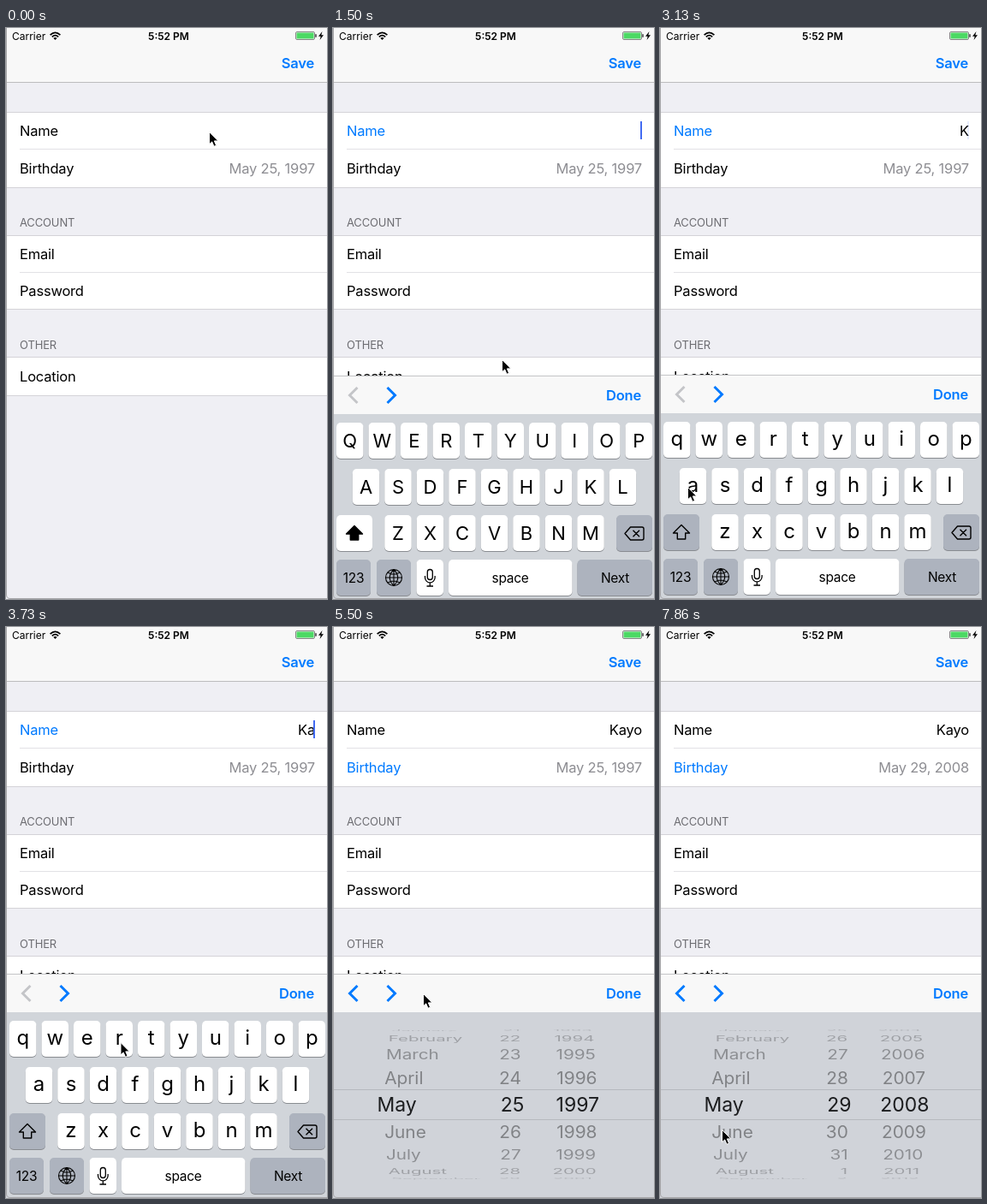
An HTML page that plays this animation: 375 px wide and 667 px high, repeating every 8 s.

```html
<!DOCTYPE html>
<html lang="en">
<head>
<meta charset="utf-8">
<title>Profile form</title>
<style>
html, body { margin: 0; width: 375px; height: 667px; overflow: hidden; background: #efeff4; }
svg { display: block; }
text { font: 16.5px Inter, "Open Sans", sans-serif; letter-spacing: -.2px; white-space: pre; }
.bold { font-weight: 600; }
.status { font-size: 12px; letter-spacing: 0; }
.head { font-size: 13px; letter-spacing: -.15px; }
.upper { font-size: 22px; letter-spacing: 0; }
.lower { font-size: 24px; letter-spacing: 0; }
.big { font-size: 36px; letter-spacing: 0; }
.small { font-size: 15.5px; letter-spacing: -.3px; }
.wheel { font-size: 23px; letter-spacing: 0; }
.pop { filter: drop-shadow(0 1px 4px #0006); }
</style>
</head>
<body>
<svg id="stage" width="375" height="667" viewBox="0 0 375 667">
  <defs>
    <clipPath id="band"><path d="M0 541H375V575H0Z"/></clipPath>
    <clipPath id="rest"><path d="M0 451H375V540H0ZM0 576H375V667H0Z"/></clipPath>
  </defs>
  <g id="form"></g>
  <g id="live"></g>
</svg>
<script>
const LOOP = 8000, STEPS = 54;
const BLUE = '#007aff', GRAY = '#8e8e93', EDGE = '#d4d3d8', SPLIT = '#e2e1e5';
const NAME = 'Kayo';
const MONTHS = ['January', 'February', 'March', 'April', 'May', 'June', 'July', 'August', 'September'];
const ROWS = [['qwertyuiop', 4, 460], ['asdfghjkl', 22.75, 514], ['zxcvbnm', 60.25, 568]];

// Each key press: letter index, first step, last step
const PRESSES = [[0, 16, 17], [1, 22, 23], [2, 26, 27], [3, 29, 30]];
const POINTER = [[0, 237, 121], [2, 266, 212], [4, 215, 160], [5, 211, 126], [8, 208, 126],
  [10, 197, 387], [13, 250, 475], [15, 301, 538], [17, 301, 538], [21, 32, 536], [23, 33, 536],
  [24, 60, 488], [26, 207, 482], [27, 209, 482], [29, 320, 482], [30, 125, 432], [32, 68, 428],
  [34, 68, 428], [37, 105, 428], [39, 120, 440], [41, 288, 590], [43, 286, 510], [44, 288, 585],
  [45, 285, 556], [46, 285, 530], [48, 212, 575], [50, 210, 520], [51, 200, 540], [53, 72, 587]];
const SLIDE = [[7, 262], [8, 150], [9, 22], [10, 1], [11, 0]];
const YEAR = [[41, 1997], [43, 2003], [44, 2005.2], [45, 2007.3], [46, 2008]];
const DAY = [[48, 25], [50, 28.2], [51, 29]];

const text = (x, y, s, cls = '', fill = '#000', anchor = 'start', more = '') =>
  `<text x="${x}" y="${y}" class="${cls}" fill="${fill}" text-anchor="${anchor}" ${more}>${s}</text>`;
const rect = (x, y, w, h, fill, r = 0) =>
  `<rect x="${x}" y="${y}" width="${w}" height="${h}" rx="${r}" fill="${fill}"/>`;
const stroke = (d, color, w = 1, more = '') =>
  `<path d="${d}" fill="none" stroke="${color}" stroke-width="${w}" ${more}/>`;

// Linear interpolation through [step, value...] points
function track(points, k, col = 1) {
  const i = points.findIndex(p => p[0] >= k);
  if (i < 0) return points[points.length - 1][col];
  if (i === 0) return points[0][col];
  const a = points[i - 1], b = points[i];
  return a[col] + (b[col] - a[col]) * (k - a[0]) / (b[0] - a[0]);
}

const group = (y, h, split) => rect(0, y, 375, h, '#fff') + rect(0, y, 375, 1, EDGE) +
  rect(0, y + h - 1, 375, 1, EDGE) + (split ? rect(16, split, 359, 1, SPLIT) : '');

function form() {
  return rect(0, 0, 375, 667, '#efeff4') + rect(0, 0, 375, 63, '#f8f8f8') + rect(0, 63, 375, 1, '#bcbcbe') +
    text(7, 13.5, 'Carrier', 'status') +
    stroke('M51.6 8.2Q57.5 2.6 63.4 8.2M53.8 10.4Q57.5 7 61.2 10.4', '#000', 1.7) +
    '<path d="M55.3 11.8Q57.5 10 59.7 11.8L57.5 14Z"/>' +
    text(190, 13.5, '5:52 PM', 'status bold', '#000', 'middle') +
    '<rect x="338.5" y="4.5" width="22" height="9" rx="1.5" fill="none" stroke="#555" stroke-width=".7"/>' +
    rect(339.5, 5.5, 20, 7, '#4cd964', .5) + rect(361.3, 7, 1.4, 4, '#333', .7) +
    '<path d="M369.5 4L365 9.8H367.7L366.6 14L371 8.2H368.3Z"/>' +
    text(360, 47, 'Save', 'bold', BLUE, 'end') +
    group(98, 89, 141) + group(242, 87, 285) + group(384, 46) +
    text(16, 232, 'ACCOUNT', 'head', '#6d6d72') + text(16, 374.5, 'OTHER', 'head', '#6d6d72') +
    text(16, 269.5, 'Email') + text(16, 313, 'Password') + text(16, 412.5, 'Location');
}

function fields(k) {
  const typed = PRESSES.filter(p => k >= p[1] + 1).length;
  const inName = k >= 8 && k < 33, inDate = k >= 33;
  const date = `May ${k < 52 ? 25 : 29}, ${k < 47 ? 1997 : 2008}`;
  let s = text(16, 125.5, 'Name', '', inName ? BLUE : '#000') +
    text(16, 169.5, 'Birthday', '', inDate ? BLUE : '#000') +
    text(361, 125.5, NAME.slice(0, typed), '', '#000', 'end') +
    text(361, 169.5, date, '', GRAY, 'end');
  if (inName) s += `<g opacity="${k % 7 % 6 ? 1 : .12}">${rect(359, 109, 2, 21, '#426bf2')}</g>`;
  return s;
}

const toolbar = back => rect(0, 405, 375, 45, '#f8f8f8') + rect(0, 405, 375, 1, '#c4c5c7') +
  stroke('M28.5 419L19.5 428L28.5 437', back ? BLUE : '#c4c5c8', 3) +
  stroke('M63.5 419L72.5 428L63.5 437', BLUE, 3) +
  text(360, 434, 'Done', 'bold', BLUE, 'end');

const key = (x, y, w, fill = '#fff') => rect(x, y + 1, w, 42, '#898c91', 5) + rect(x, y, w, 42, fill, 5);

function popup(letter, cx, y) {
  return `<path class="pop" fill="#fcfcfc" d="M${cx - 18.5} ${y - 66}h37q10 0 10 10v32c0 14-12.5 12-12.5 28v33` +
    `q0 5-5 5h-22q-5 0-5-5v-33c0-16-12.5-14-12.5-28v-32q0-10 10-10z"/>` +
    text(cx, y - 22.5, letter, 'big', '#000', 'middle');
}

function keyboard(k) {
  const caps = k < 18, dark = '#adb3be';
  const press = PRESSES.find(p => k >= p[1] && k <= p[2]);
  const active = press && NAME[press[0]].toLowerCase();
  let s = rect(0, 450, 375, 217, '#d1d5da'), bubble = '';
  for (const [letters, x0, y] of ROWS) {
    [...letters].forEach((c, i) => {
      const x = x0 + i * 37.5, cx = x + 15.75, label = caps ? c.toUpperCase() : c;
      s += key(x, y, 31.5) + text(cx, y + (caps ? 29 : 28), label, caps ? 'upper' : 'lower', '#000', 'middle');
      if (c === active) bubble = popup(label, cx, y);
    });
  }
  const arrow = 'M25 580.5L34.5 590H29.7V597H20.3V590H15.5Z';
  s += key(4, 568, 42, caps ? '#fff' : dark) +
    `<path d="${arrow}" fill="${caps ? '#000' : 'none'}" stroke="#000" stroke-width="1.4" stroke-linejoin="round"/>` +
    key(331, 568, 42, dark) +
    stroke('M341 589.5L347.5 582H361Q363 582 363 584V595Q363 597 361 597H347.5ZM350.5 585.8L358 593.3M358 585.8L350.5 593.3',
      '#000', 1.4, 'stroke-linejoin="round"') +
    key(4, 620, 40, dark) + text(24, 647, '123', 'small', '#000', 'middle') +
    key(51, 620, 40, dark) +
    stroke('M61.5 641a9.5 9.5 0 1 0 19 0a9.5 9.5 0 1 0-19 0H80.5M71 631.5V650.5M71 631.5q-9.5 9.5 0 19q9.5-9.5 0-19' +
      'M64 635q7 4 14 0M64 647q7-4 14 0', '#000', 1.1) +
    key(97.5, 620, 31.5) +
    '<rect x="110.3" y="631.5" width="6" height="12" rx="3" fill="none" stroke="#000" stroke-width="1.3"/>' +
    stroke('M107.5 639v2a5.8 5.8 0 0 0 11.6 0v-2M113.3 647V651M109.5 651H117', '#000', 1.3) +
    key(135, 620, 144.5) + text(207, 647, 'space', 'small', '#000', 'middle') +
    key(285.5, 620, 87.5, dark) + text(329.5, 647, 'Next', 'small', '#000', 'middle');
  return toolbar(false) + s + bubble;
}

// A picker column bent around a cylinder; the centre band is magnified
function wheel(pos, label, anchor, centreX, outerX, bend, inBand) {
  let s = '';
  for (let i = Math.round(pos) - 4; i <= Math.round(pos) + 4; i++) {
    const a = (i - pos) * .37, squash = Math.cos(a);
    if (squash < .03 || label(i) === undefined) continue;
    const x = inBand ? centreX : outerX + bend * (1 - squash);
    const scale = inBand ? 1 : .91 - .04 * (1 - squash);
    s += text(0, 8.2, label(i), 'wheel', inBand ? '#1c1d1f' : '#000', anchor,
      `opacity="${inBand ? 1 : .1 + .3 * squash}" ` +
      `transform="translate(${x} ${558.2 + 87 * Math.sin(a)}) scale(${scale} ${scale * squash})"`);
  }
  return s;
}

function picker(k) {
  const columns = inBand =>
    wheel(4, i => MONTHS[i], 'start', 51.5, 59.5, 9.5, inBand) +
    wheel(track(DAY, k), i => (i - 1) % 31 + 1, 'end', 223.5, 220, -1.5, inBand) +
    wheel(track(YEAR, k), i => i, 'middle', 285.8, 285.3, -6, inBand);
  return toolbar(true) + rect(0, 450, 375, 217, '#d0d3d9') +
    `<g clip-path="url(#rest)">${columns(false)}</g><g clip-path="url(#band)">${columns(true)}</g>` +
    rect(0, 540, 375, 1, '#b6b9be') + rect(0, 575, 375, 1, '#b6b9be');
}

const pointer = k => `<path transform="translate(${track(POINTER, k)} ${track(POINTER, k, 2)})" ` +
  'd="M.5 .5V14.8L3.7 11.9L6 17.3L8.6 16.2L6.3 10.9H10.8Z" stroke="#fff" stroke-width="1"/>';

function draw(k) {
  const input = k < 8 ? '' : k < 34 ? keyboard(k) : picker(k);
  live.innerHTML = fields(k) + `<g transform="translate(0 ${track(SLIDE, k)})">${input}</g>` +
    stroke('M.5 0V662Q.5 666.5 5 666.5H375', '#a6a6a9') + pointer(k);
}

const live = document.getElementById('live');
document.getElementById('form').innerHTML = form();
let shown = -1;
function tick() {
  const k = Math.floor(performance.now() % LOOP / LOOP * STEPS);
  if (k !== shown) draw(shown = k);
  requestAnimationFrame(tick);
}
tick();
</script>
</body>
</html>
```
